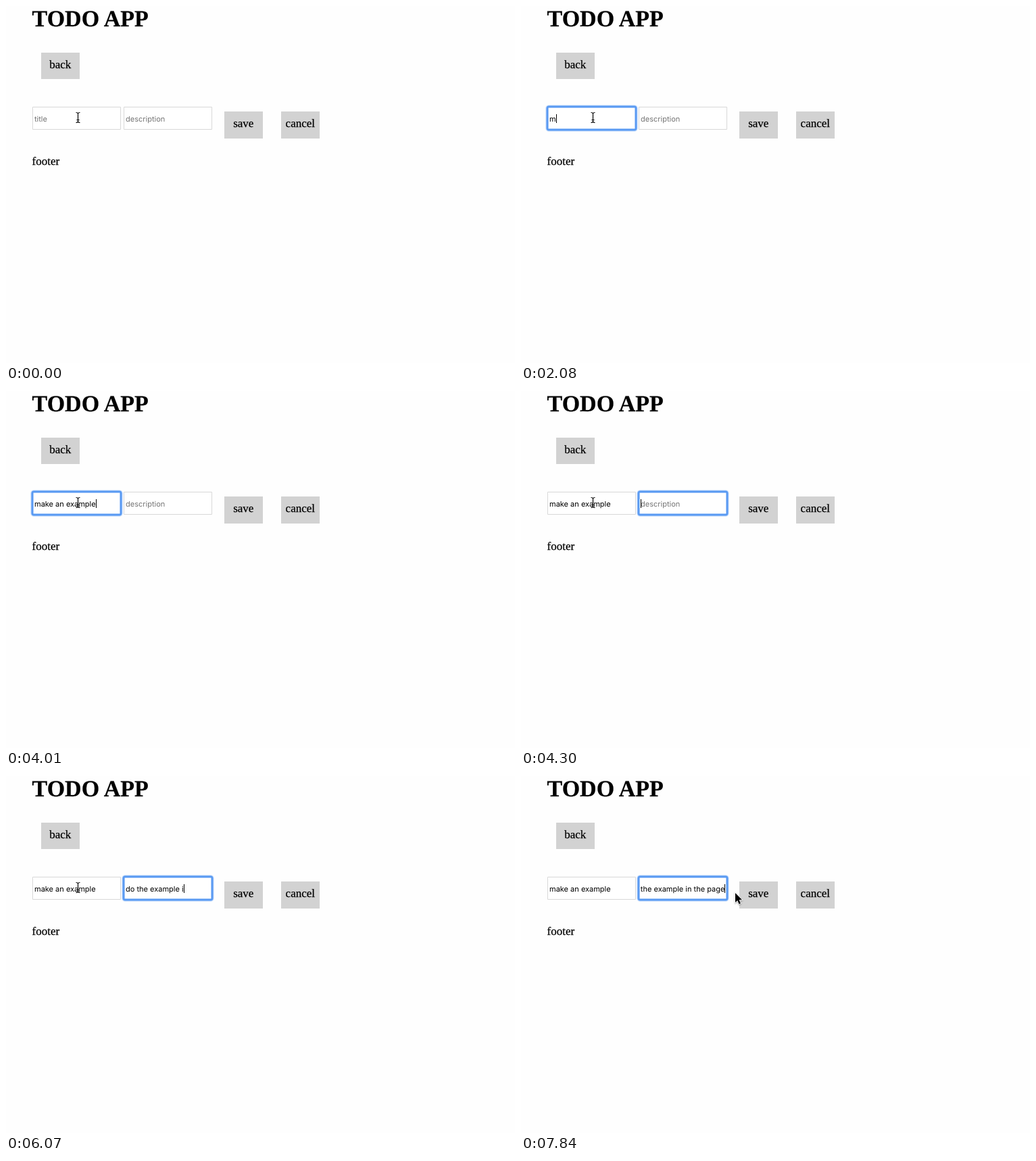
Write an HTML page with a canvas that moves like this. It is 753 by 528 pixels and loops after 7.99 s.

```html
<!DOCTYPE html>
<html lang="en">
<head>
<meta charset="utf-8">
<title>Todo form</title>
<style>
  html, body { margin: 0; width: 100%; height: 100%; overflow: hidden; background: #fefefe; }
  canvas { display: block; }
</style>
</head>
<body>
<canvas id="stage" width="753" height="528"></canvas>
<script>
const ctx = document.getElementById('stage').getContext('2d');
const LOOP = 7990, STEP = 148; // ms; the screen refreshes once per step
const SERIF = '"Liberation Serif", "Times New Roman", serif';
const SANS = '11px Inter, "Liberation Sans", sans-serif';
const LEFT = 38.6;

// keys: [step, characters typed], joined by steady typing
const title = {
  x: 39, hint: 'title', value: 'make an example', focus: 1, blur: 29,
  keys: [[14, 1], [15, 2], [16, 2], [17, 3], [21, 9], [22, 9], [23, 10], [27, 15]]
};
const desc = {
  x: 174, hint: 'description', value: 'do the example in the page', focus: 29, blur: Infinity,
  keys: [[31, 1], [35, 8], [38, 11], [45, 24], [46, 24], [47, 26]]
};
const glide = { start: 48, end: 53, from: [106, 165], to: [317, 173] };

const lerp = (a, b, k) => a + (b - a) * k;
const clamp = k => Math.min(1, Math.max(0, k));
const smooth = k => k * k * (3 - 2 * k);

function typedCount(keys, step) {
  if (step < keys[0][0]) return 0;
  const next = keys.findIndex(([at]) => at > step);
  if (next < 0) return keys[keys.length - 1][1];
  const [s0, n0] = keys[next - 1], [s1, n1] = keys[next];
  return Math.floor(lerp(n0, n1, (step - s0) / (s1 - s0)));
}

// The caret stays lit while typing and blinks when idle.
function caretLit({ focus, keys }, step) {
  const last = keys[keys.length - 1][0];
  const idle = step < keys[0][0] ? step - focus : Math.max(0, step - last);
  return Math.floor((idle * STEP + 118) / 500) % 2 === 0;
}

function text(str, x, y, font, color = '#000', align = 'left') {
  ctx.font = font;
  ctx.fillStyle = color;
  ctx.textAlign = align;
  ctx.fillText(str, x, y);
}

function serif(str, x, y, font = '17px ', align = 'left') {
  text(str, x, y, font + SERIF, '#000', align);
  ctx.lineWidth = 0.25;
  ctx.strokeStyle = '#000';
  ctx.strokeText(str, x, y);
}

function button(label, x, y, h) {
  ctx.fillStyle = '#d2d2d2';
  ctx.fillRect(x, y, 57, h);
  serif(label, x + 28.3, y + 23, '17px ', 'center');
}

function ring(x, grow, width, radius, color) {
  ctx.beginPath();
  ctx.roundRect(x - grow, 149 - grow, 131 + 2 * grow, 34 + 2 * grow, radius);
  ctx.lineWidth = width;
  ctx.strokeStyle = color;
  ctx.stroke();
}

function field(f, step) {
  const typed = f.value.slice(0, typedCount(f.keys, step));
  const focused = step >= f.focus && step < f.blur;
  const left = f.x + 3;
  ctx.fillStyle = '#fff';
  ctx.fillRect(f.x, 149, 131, 34);
  ring(f.x, -0.5, 1, 0, '#d8d8d8');
  if (focused) {
    ring(f.x, 0.5, 5, 3, 'rgba(90,155,245,0.2)');
    ring(f.x, 0.2, 3.6, 2.5, 'rgba(90,155,245,0.5)');
    ring(f.x, 0, 2.4, 2, '#5a9af2');
  }
  ctx.save();
  ctx.beginPath();
  ctx.rect(left, 152, 125, 28);
  ctx.clip();
  ctx.font = SANS;
  const width = ctx.measureText(typed).width;
  const scroll = Math.max(0, width - 124.4);
  text(typed || f.hint, left - scroll, 171, SANS, typed ? '#000' : '#757575');
  if (focused && caretLit(f, step)) {
    ctx.fillStyle = '#000';
    ctx.fillRect(Math.round(left + width - scroll), 160, 1, 13);
  }
  ctx.restore();
}

function beam(x, y) {
  ctx.save();
  ctx.translate(x + 0.5, y);
  ctx.beginPath();
  for (const s of [-1, 1]) {
    ctx.moveTo(-3, 7.5 * s);
    ctx.quadraticCurveTo(-0.5, 7.5 * s, 0, 6 * s);
    ctx.quadraticCurveTo(0.5, 7.5 * s, 3, 7.5 * s);
  }
  ctx.moveTo(0, -6);
  ctx.lineTo(0, 6);
  ctx.moveTo(-2, 3.5);
  ctx.lineTo(2, 3.5);
  ctx.lineWidth = 2.4;
  ctx.strokeStyle = 'rgba(255,255,255,0.6)';
  ctx.stroke();
  ctx.lineWidth = 1.2;
  ctx.strokeStyle = '#000';
  ctx.stroke();
  ctx.restore();
}

function arrow(x, y) {
  ctx.save();
  ctx.translate(x, y);
  const shape = new Path2D('M0 0V14L3.2 11L5.6 16.4L8 15.3L5.6 10.2L10 10Z');
  ctx.shadowColor = 'rgba(0,0,0,0.35)';
  ctx.shadowBlur = 2;
  ctx.shadowOffsetY = 1;
  ctx.lineWidth = 1.6;
  ctx.strokeStyle = '#fff';
  ctx.stroke(shape);
  ctx.shadowColor = 'transparent';
  ctx.fillStyle = '#000';
  ctx.fill(shape);
  ctx.restore();
}

function pointer(step) {
  const { start, end, from, to } = glide;
  const k = smooth(clamp((step - start) / (end - start)));
  const [x, y] = from.map((v, i) => Math.round(lerp(v, to[i], k)));
  const overField = x < desc.x + 131;
  (overField ? beam : arrow)(x, y);
}

function draw(t) {
  const step = Math.floor((t + 8) / STEP);
  ctx.textRendering = 'geometricPrecision';
  ctx.fillStyle = '#fefefe';
  ctx.fillRect(0, 0, 753, 528);
  serif('TODO APP', LEFT, 30, 'bold 34px ');
  button('back', 52, 69, 39);
  button('save', 323, 156, 40);
  button('cancel', 407, 156, 40);
  serif('footer', LEFT, 235);
  field(title, step);
  field(desc, step);
  pointer(step);
}

const start = performance.now();
function tick() {
  draw((performance.now() - start) % LOOP);
  requestAnimationFrame(tick);
}
tick();
</script>
</body>
</html>
```
